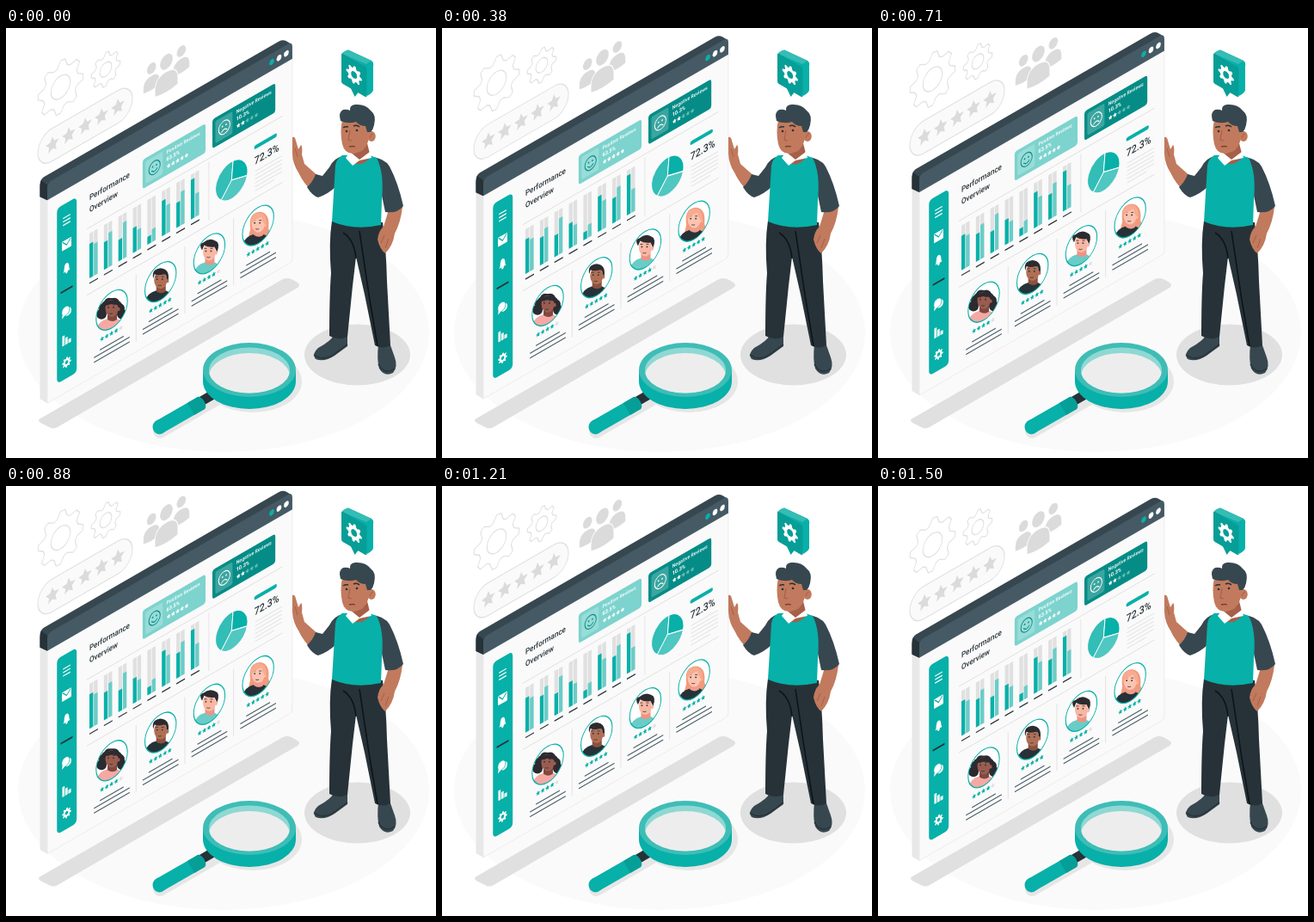
An HTML page for the animation above (1.54 s loop, 500 by 500 pixels).

```html
<!DOCTYPE html>
<html lang="en">
<head>
<meta charset="utf-8">
<title>Performance overview</title>
<style>
  html, body { margin: 0; width: 100%; height: 100%; overflow: hidden; background: #fff; }
  svg { display: block; width: 100%; height: 100%; }
  text { font-family: Roboto, sans-serif; }
</style>
</head>
<body>
<svg id="stage" viewBox="0 0 500 500"></svg>
<script>
const TEAL = '#07b0a8', DEEP = '#058c86', LIGHT = '#6accc7', INK = '#263238', SLATE = '#37474f',
      STEEL = '#455a64', GREY = '#e0e0e0', SKIN = '#c17a5d', SHADE = '#a65f49';

// Isometric planes: "left" rises to the right, "right" falls to the right.
const left = (x, y, body) => `<g transform="matrix(.866 -.5 0 1 ${x} ${y})">${body}</g>`;
const right = (x, y, body) => `<g transform="matrix(.866 .5 0 1 ${x} ${y})">${body}</g>`;
const upright = body => `<g transform="matrix(1.155 .577 0 1 0 0)">${body}</g>`;

const path = (d, fill, extra = '') => `<path d="${d}" fill="${fill}" ${extra}/>`;
const line = (d, stroke, width, extra = '') =>
  `<path d="${d}" fill="none" stroke="${stroke}" stroke-width="${width}" ${extra}/>`;
const rect = (x, y, w, h, fill, r = 0) =>
  `<rect x="${x}" y="${y}" width="${w}" height="${h}" rx="${r}" fill="${fill}"/>`;
const oval = (x, y, rx, ry, fill, extra = '') =>
  `<ellipse cx="${x}" cy="${y}" rx="${rx}" ry="${ry}" fill="${fill}" ${extra}/>`;
const disc = (x, y, r, fill, extra) => oval(x, y, r, r, fill, extra);
const text = (x, y, size, fill, weight, str) =>
  `<text x="${x}" y="${y}" font-size="${size}" font-weight="${weight}" fill="${fill}">${str}</text>`;
const list = (n, f) => Array.from({ length: n }, (_, i) => f(i)).join('');

const ring = (n, radius) => 'M' + Array.from({ length: n }, (_, i) => {
  const a = i * 2 * Math.PI / n - Math.PI / 2, r = radius(i);
  return `${(r * Math.cos(a)).toFixed(2)} ${(r * Math.sin(a)).toFixed(2)}`;
}).join('L') + 'Z';
const star = (x, y, r, fill) =>
  path(ring(10, i => i % 2 ? r * .48 : r), fill, `transform="translate(${x} ${y})"`);
const gear = (R, r) => ring(32, i => i % 4 < 2 ? R : r);
const stars = (x, y, step, r, on, off, count) =>
  list(5, i => star(x + i * step, y, r, i < count ? on : off));

function icons() {
  const outline = `stroke="${GREY}" stroke-width="1.2" stroke-linejoin="round"`;
  const cog = (x, y, R, r, hole) => left(x, y,
    path(gear(R, r), 'none', outline) + disc(0, 0, hole, 'none', outline));
  const person = (x, y, s) => `<g transform="translate(${x} ${y}) scale(${s})">` +
    disc(0, -10, 8.5, '#dbdbdb') + path('M-15 23V16C-15 6-9 2 0 2S15 6 15 16V23Q0 27-15 23Z', '#dbdbdb') + '</g>';
  return cog(63.5, 67.5, 30.5, 23.5, 13) + cog(116, 47, 19.5, 15, 8) +
    left(92, 112.5, `<rect x="-63.5" y="-19" width="127" height="38" rx="19" fill="#fafafa" ${outline}/>` +
      stars(-44, 0, 22, 9.5, '#dbdbdb', GREY, 5)) +
    left(186.5, 48, person(-20, -5, .72) + person(20, -5, .72) +
      '<g stroke="#fff" stroke-width="2" paint-order="stroke">' + person(0, 0, 1) + '</g>');
}

function sidebar() {
  const w = '#fff';
  const icon = (y, body) => `<g transform="translate(26 ${y}) scale(.9)">${body}</g>`;
  return rect(13, -220, 26.5, 204, TEAL, 5) +
    icon(-200, line('M-5.5-4.5H5.5M-5.5 0H5.5M-5.5 4.5H5.5', w, 1.5)) +
    icon(-172, rect(-7, -6, 14, 12, w, 1) + line('M-6-5L0 1L6-5', TEAL, 1.3)) +
    icon(-144.5, path('M-5 4.5Q-3.5 2.500-3.500-1.500Q-3-6 0-6Q3-6 3.500-1.500Q3.500 2.500 5 4.500Z', w) + disc(0, 5.5, 1.7, w)) +
    line('M18-119H34', INK, 2) +
    icon(-94, disc(2, 1.5, 5, w) + disc(-1.5, -1, 5.8, w, `stroke="${TEAL}" stroke-width=".8"`) + path('M-6 1L-7 7L-2 4Z', w)) +
    icon(-61, rect(-6.5, -7, 3.5, 13, w) + rect(-2, -3, 3.5, 9, w) + rect(2.5, 1, 4, 5, w)) +
    icon(-34.5, path(gear(6.8, 4.9), w) + disc(0, 0, 2.3, TEAL));
}

function card(x, fill, ink, mouth, label, value, count) {
  return `<g transform="translate(${x} -219)">` + rect(0, 0, 84.5, 34, fill, 3) +
    '<g opacity=".22">' + rect(4, 4, 23, 26, '#fff', 2) + '</g>' +
    disc(16, 17, 7.6, 'none', `stroke="${ink}" stroke-width="1.1"`) +
    disc(13.5, 15, 1, ink) + disc(18.5, 15, 1, ink) + line(mouth, ink, 1.1) +
    text(32, 9.5, 6, '#fff', 500, label) + text(32, 17.8, 6.4, '#fff', 700, value) +
    stars(35, 24.5, 6, 2.9, '#fff', 'rgba(255,255,255,.4)', count) + '</g>';
}

function charts() {
  const bars = [[40, 37], [32, 40], [25, 42], [29, 24], [9, 15], [41, 33], [29, 39], [46, 27]];
  return bars.map(([a, b], i) => {
    const x = 56.6 + i * 19.45;
    return rect(x, -169, 5, 52, GREY) + rect(x + 6, -169, 5, 52, GREY) +
      rect(x, -117 - a, 5, a, TEAL) + rect(x + 6, -117 - b, 5, b, LIGHT) +
      line(`M${x} -111h11.5`, INK, 1.4);
  }).join('') +
  `<g transform="translate(247.5 -135.5)" stroke="#fafafa" stroke-width="1.2">` +
    path('M0 0L-14 16.500A21.600 21.600 0 0 1 2-21.500Z', '#32bdb7') +
    path('M0 0L2-21.500A21.600 21.600 0 0 1 21 5Z', TEAL) +
    path('M0 0L21 5A21.600 21.600 0 0 1-14 16.500Z', '#50c7c1') + '</g>' +
  line('M280-158H306', TEAL, 4.5, 'stroke-linecap="round"') +
  text(278, -138, 12.3, INK, 500, '72.3%') +
  list(6, i => line(`M279 ${-130 + i * 4.5}H${i == 5 ? 305 : 315}`, GREY, 1));
}

function avatars() {
  const hairDark = '#2b2b30';
  const head = (skin, shade, shirt) => path('M-19 26Q-17 13-5 10H6Q15 13 19 26Z', shirt) +
    path('M-5 2H6V11Q1 15-5 11Z', shade) + oval(0, -2, 7.5, 10, skin) + disc(7.5, -1, 2.2, skin) +
    disc(-4, -3, .9, INK) + disc(2, -3, .9, INK) + line('M-6-6h3M1-6h3M-3 4q2 1 4 0', INK, .8);
  const curls = list(9, i => disc(-12 + i * 3, -8 + (i - 4) ** 2 * .8 - i % 2, 6, hairDark));
  const crop = path('M-8.5-4Q-11-15 0-16Q11-15 9-2L7-4Q7-9 4-9Q-3-7-7-9Z', hairDark);
  const tuft = path('M-8.500-4Q-13-12-7-13Q0-19 7-15Q13-13 9-2L6-8Q-1-7-6-10Z', hairDark);
  const long = path('M-9 4Q-12-15 2-16Q14-15 12 3Q14 10 16 15L-12 17Z', '#f29a7d');
  const fringe = path('M-8.500-1Q-9-15 2-15Q11-13 9.500 1Q5-3 4-10Q-3-8-8.500-1Z', '#f7ab8f');
  const people = [
    [curls + head('#9b5c50', '#80483e', '#f5a9a4') + path('M-8-5Q-5-14 6-11L9-4Q3-9-8-5Z', hairDark), 4],
    [head('#b06f55', '#8c503e', INK) + crop, 4.5],
    [head('#f9b7a3', '#eb9484', LIGHT) + tuft, 4],
    [long + head('#fdc3b0', '#f09c8b', INK) + fringe, 5]
  ];
  return people.map(([face, rating], i) =>
    `<g transform="translate(${86.6 + i * 65.5} -65)">` + disc(0, 0, 21, '#fff') +
    `<g clip-path="url(#round)">${upright(face)}</g>` + disc(0, 0, 21, 'none', `stroke="${TEAL}" stroke-width="1.2"`) +
    stars(-13, 27, 6.3, 3, TEAL, GREY, rating) +
    line('M-16 38.500H16M-24 43.500H24M-24 49H24', STEEL, 1.3) + '</g>' +
    (i ? line(`M${53.7 + i * 65.5} -90V-12`, GREY, 1) : '')).join('');
}

function board() {
  return path('M39.500 181Q39.500 175 44 172L317 14.500Q322 12 326 14L333 19V270L48 435L39.500 430Z', '#e8e8e8') +
    path('M39.500 195V181Q39.500 175 44 172L317 14.500Q322 12 326 14L331 17L48 185V199Z', SLATE) +
    left(48, 435,
      path('M0 0V-236H329V-4Q329 0 325 0Z', '#fafafa', 'stroke="#ebebeb" stroke-width=".8"') +
      path('M0-236V-250Q0-256 6-256H323Q329-256 329-250V-236Z', STEEL) +
      disc(301.4, -246, 3.3, TEAL) + disc(311.2, -246, 3.3, '#fff') + disc(321, -246, 3.3, '#fff') +
      sidebar() +
      text(56.6, -207.5, 9.3, INK, 500, 'Performance') + text(56.6, -193.5, 9.3, INK, 500, 'Overview') +
      line('M53-176H316M53-99H316M217-172V-104', GREY, 1) +
      card(128, '#7dd3ce', DEEP, 'M12 19q4 4.500 8 0', 'Positive Reviews', '63.5%', 5) +
      card(221.7, DEEP, '#fff', 'M12 21.500q4-4.500 8 0', 'Negative Reviews', '10.3%', 2) +
      charts() + avatars()) +
    path('M39.500 195V184Q39.500 179 41 176L48 181V199Z', INK);
}

function magnifier() {
  return oval(287, 411, 57, 36, '#e6e6e6') + line('M179 469L250 428', '#e6e6e6', 16, 'stroke-linecap="round"') +
    line('M222 437L247 422.500', INK, 11) +
    line('M180 463L227 436', TEAL, 16) + oval(178.5, 464, 8, 8.5, TEAL) +
    line('M215 443L227 436', '#059f98', 16) + oval(227, 436, 4, 8, '#059f98', 'transform="rotate(-30 227 436)"') +
    path('M229 397V411A54 32 0 0 0 337 411V397Z', TEAL) + oval(283, 397.5, 54, 31.5, '#3ebdb6') +
    oval(283, 398, 47, 26.5, '#8fd8d3') +
    `<g clip-path="url(#lens)">` + oval(283, 405, 47, 27, '#ededed') + '</g>';
}

function man() {
  return path('M381 357Q378 364 363 372Q355 379 360 385Q370 389 382 381L397 370V357Z', SLATE) +
    path('M433 368Q431 385 434 396Q440 406 450 401Q456 394 452 383L447 369Z', SLATE) +
    line('M358 380Q369 388 382 379L397 368M433 391Q440 404 452 396', INK, 1.5) +
    // legs
    path('M379 224L438 226Q442 255 443 295L447 369Q438 374 429 369L417 310L407 266L403 300L397 359Q387 364 376 358Q376 310 378 285Q375 250 379 224Z', INK) +
    line('M407 268Q405 246 392 238M411 236L422 310L432 370', '#0d1417', 1.6) +
    // arm hanging down
    path('M446 208L461 208Q459 226 452 239Q450 253 441 262Q435 258 432 246Q433 236 439 231Z', SKIN) +
    line('M436 250L440 241M441 256L445 245', SHADE, 1) +
    path('M424 150Q440 151 446 161Q456 180 462 207Q455 216 441 214L436 190Z', SLATE) +
    // raised arm
    path('M333 127Q336 126 337 131L340 141L343 136Q345 137 344 147L347 158L365 174L357 191Q346 181 340 168Q333 157 333 146Z', SKIN) +
    line('M336 140L339 150', SHADE, 1) +
    path('M392 149Q381 151 376 162L368 172L360 170Q357 179 350 185Q356 195 363 197Q375 193 385 183Z', SLATE) +
    // vest
    path('M391 148Q384 152 383 160L379 225Q405 236 436 229L437 200Q440 168 431 151L420 147Z', TEAL) +
    path('M402 140L420 134L424 150Q413 163 402 156Z', SHADE) +
    path('M400 144L395 151L403 160L411 154L425 151L423 144L411 153Z', '#fff') +
    // head
    path('M391 107Q388 120 391 135Q394 147 405 146Q418 144 421 132L425 117L414 106Z', SKIN) +
    oval(425, 126, 4.8, 6, SKIN) + line('M423 128Q424 123 427 123', SHADE, 1) +
    path('M389 108Q386 98 392 95Q397 94 400 96Q399 90 406 89Q418 88 424 96Q431 101 428 113Q427 118 424 121H420L418 114Q411 114 407 109Q398 112 389 108Z', SLATE) +
    disc(396, 120, 1.3, INK) + disc(408, 119, 1.3, INK) +
    line('M392 116q3-2 6-1M404 114q4-2 7 1', INK, 1.5) +
    line('M400 119L398 130L402 131', SHADE, 1.1) + line('M399 138q4-1 7 0', '#7b3f32', 1.3);
}

function bubble() {
  return path('M390.500 31Q391 28 398 25.500L425 38Q428 40 427 44V72Q427 75 420 79Z', TEAL) +
    path('M390.500 30Q392 27 398 25.500L425 38L419 42Z', '#35bcb5') +
    right(390, 29, rect(0, 0, 34, 35, '#079e97', 2) + path('M12 34L18 42L23 34Z', '#079e97') +
      path(gear(10.5, 7.8), '#fff', 'transform="translate(17 17)"') + disc(17, 17, 4, '#079e97'));
}

document.getElementById('stage').innerHTML =
  `<defs><clipPath id="round"><circle r="21"/></clipPath>
   <clipPath id="lens"><ellipse cx="283" cy="398" rx="47" ry="26.5"/></clipPath></defs>` +
  oval(253, 354, 239, 139, '#fafafa') +
  path('M40 454L322 292Q327 290 332 292L339 296Q343 299 339 302L60 464Q55 467 50 464L40 459Q36 456 40 454Z', GREY) +
  oval(408.5, 380, 61.5, 35.5, GREY) +
  `<g id="float">${icons()}${board()}</g>` + magnifier() + man() + bubble();

const LOOP = 1540, RISE = 10, REST = 1.2;
const floating = document.getElementById('float');
const start = performance.now();

function tick() {
  const phase = (performance.now() - start) % LOOP / LOOP;
  const lift = RISE * (1 - Math.abs(1 - 2 * phase));
  floating.setAttribute('transform', `translate(0 ${REST - lift})`);
  requestAnimationFrame(tick);
}
tick();
</script>
</body>
</html>
```
